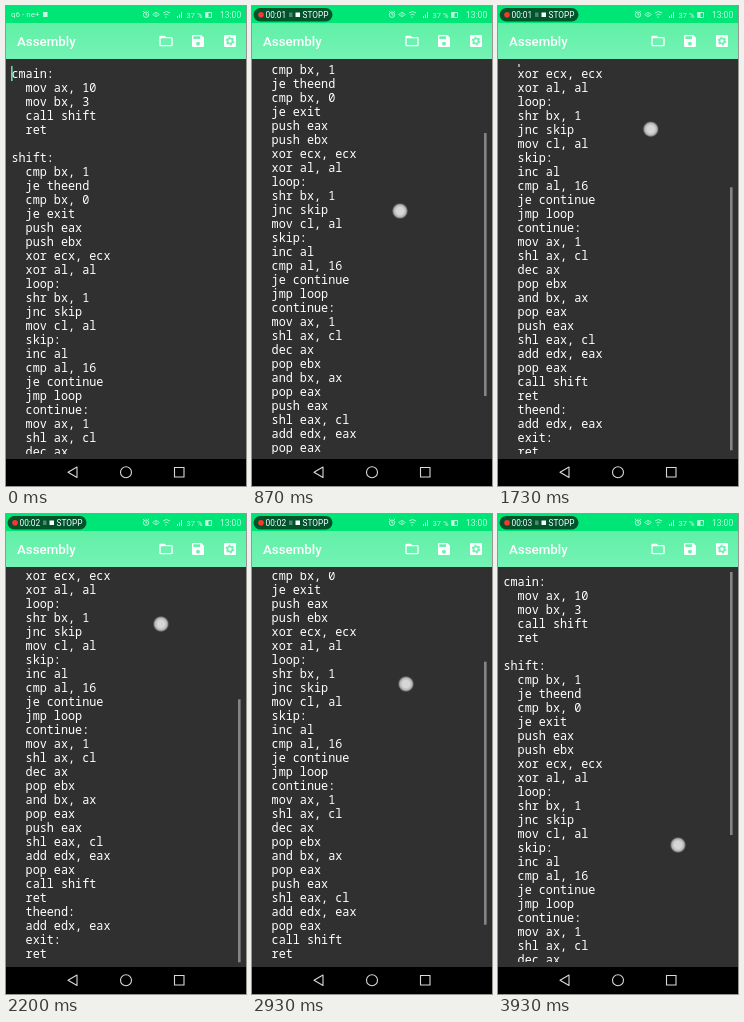
These frames come from a looping animation (240x480 px, 3.99 s). An HTML page:

```html
<!DOCTYPE html>
<html lang="en">
<meta charset="utf-8">
<title>Assembly</title>
<style>
  html, body { margin: 0; width: 100%; height: 100%; overflow: hidden; background: #303030; }
  svg { display: block; width: 100%; height: 100%; }
  text { fill: #fff; font-family: Roboto, sans-serif; white-space: pre; }
  #code text { font: 11.8px "Noto Sans Mono", "DejaVu Sans Mono", monospace; }
  .line { fill: none; stroke: #fff; }
</style>
<svg viewBox="0 0 240 480">
  <defs>
    <linearGradient id="bar" x2="0" y2="1">
      <stop stop-color="#60f0a6"/><stop offset="1" stop-color="#74f3b5"/>
    </linearGradient>
    <radialGradient id="touch">
      <stop offset=".45" stop-color="#d6d6d6"/>
      <stop offset=".75" stop-color="#b4b4b4"/>
      <stop offset=".85" stop-color="#8a8a8a"/>
      <stop offset="1" stop-color="#606060" stop-opacity=".3"/>
    </radialGradient>
    <clipPath id="view"><path d="M0 58H240V448H0z"/></clipPath>
  </defs>
  <rect width="240" height="480" fill="#303030"/>

  <g clip-path="url(#view)">
    <g id="code"><rect id="caret" x="5" y="60" width="1.6" height="15" fill="#5fe0a5"/></g>
  </g>
  <rect id="thumb" x="232" width="2.6" height="263" fill="#858585"/>

  <!-- status bar -->
  <rect width="240" height="17" fill="#00e676"/>
  <g opacity=".78">
    <g id="carrier">
      <text x="5" y="11.3" font-size="8">q6 - ne+</text>
      <path d="M37 6h4.5v5H37z" fill="#fff"/>
    </g>
    <g class="line" stroke-width=".9">
      <circle cx="140" cy="8.7" r="2.7"/>
      <path d="M140 7v2h1.4M137 6l1.3-1.2M143 6l-1.3-1.2"/>
      <path d="M147 8.5q3-4 6 0q-3 4-6 0zM150 7.5v2"/>
      <path d="M157 7q3.5-3 7 0M158.5 9q2-1.6 4 0"/>
      <path d="M199.5 6.5h6v5h-6z"/>
    </g>
    <path d="M160 10.3l1 1.2h-2zM171 12v-2h1v2zM173 12V8.500h1V12zM175 12V6h1v6zM200 7h2.500v4H200z" fill="#fff"/>
    <text x="180.500" y="11.500" font-size="7.600">37 %</text>
    <text x="214" y="11.800" font-size="8.500">13:00</text>
  </g>
  <g id="pill">
    <rect x="1.500" y="2" width="79" height="13.500" rx="6.700" fill="#003d20" opacity=".86"/>
    <circle cx="9" cy="8.700" r="2.800" fill="#f33a2c"/>
    <text id="clock" x="13.500" y="11.800" font-size="8.300"></text>
    <path d="M37 6.500h3.500v4.500H37z" fill="#4c8a67"/>
    <path d="M43.500 6.500h4.500V11h-4.500z" fill="#fff"/>
    <text x="50.500" y="11.800" font-size="8.300">STOPP</text>
  </g>

  <!-- app bar -->
  <rect y="17" width="240" height="36" fill="url(#bar)"/>
  <text x="11" y="39.500" font-size="13.300" font-weight="500">Assembly</text>
  <g fill="#fff" fill-rule="evenodd">
    <path transform="translate(152 27)scale(.667)" d="M4 4h6l2 2h8q2 0 2 2v10q0 2-2 2H4q-2 0-2-2V6q0-2 2-2zM4 8v10h16V8z"/>
    <path transform="translate(184 27)scale(.667)" d="M5 3h12l4 4v12q0 2-2 2H5q-2 0-2-2V5q0-2 2-2zM5 5v4h10V5zM9 16a3 3 0 0 0 6 0a3 3 0 0 0-6 0z"/>
    <rect x="218" y="29" width="12" height="12" rx="1.300"/>
  </g>
  <g fill="none" stroke="#6cf1b0">
    <circle cx="224" cy="35" r="2.500" stroke-width="1.700"/>
    <circle cx="224" cy="35" r="3.800" stroke-width="1.200" stroke-dasharray="2 1.979"/>
  </g>

  <!-- navigation bar -->
  <rect y="453" width="240" height="27"/>
  <g class="line" stroke-width="1.100" opacity=".85">
    <path d="M71 461v10.500L62 466.200z" stroke-linejoin="round"/>
    <circle cx="120" cy="466.300" r="5.500"/>
    <path d="M168.500 461.500h9.500v9.500h-9.500z"/>
  </g>

  <circle id="finger" r="8" fill="url(#touch)"/>
</svg>
<script>
const $ = id => document.getElementById(id);
const STEP = 66.5, STEPS = 60, MAX_SCROLL = 188;

const source = `cmain:|  mov ax, 10|  mov bx, 3|  call shift|  ret||shift:|  cmp bx, 1|  je theend|  cmp bx, 0|  je exit|  push eax|  push ebx|  xor ecx, ecx|  xor al, al|  loop:|  shr bx, 1|  jnc skip|  mov cl, al|  skip:|  inc al|  cmp al, 16|  je continue|  jmp loop|  continue:|  mov ax, 1|  shl ax, cl|  dec ax|  pop ebx|  and bx, ax|  pop eax|  push eax|  shl eax, cl|  add edx, eax|  pop eax|  call shift|  ret|  theend:|  add edx, eax|  exit:|  ret`;
source.split('|').forEach((line, i) => {
  const text = document.createElementNS('http://www.w3.org/2000/svg', 'text');
  text.setAttribute('x', 5.4);
  text.setAttribute('y', 72 + 14 * i);
  text.textContent = line;
  $('code').append(text);
});

// step, finger x, finger y, finger y at which the page stands at its top
const drag = [
  [2, 146, 312, 307], [13, 148, 205, 307], [21, 150.5, 142, 307], [33, 155, 110, 302.5],
  [44, 154, 170, 302.5], [51, 171, 278, 300.5], [59, 180, 331, 300.5]
];

const slope = (i, c) => (drag[i + 1][c] - drag[i][c]) / (drag[i + 1][0] - drag[i][0]);

// Harmonic mean keeps the curve from overshooting
function tangent(i, c) {
  if (!i || i === drag.length - 1) return 0;
  const a = slope(i - 1, c), b = slope(i, c);
  return a * b > 0 ? 2 * a * b / (a + b) : 0;
}

function along(step, c) {
  let i = 0;
  while (i < drag.length - 2 && step >= drag[i + 1][0]) i++;
  const [p, q] = [drag[i], drag[i + 1]], span = q[0] - p[0];
  const u = Math.max(0, Math.min(1, (step - p[0]) / span)), v = 1 - u;
  return v * v * (1 + 2 * u) * p[c] + u * u * (3 - 2 * u) * q[c]
    + span * u * v * (v * tangent(i, c) - u * tangent(i + 1, c));
}

const show = (id, on) => $(id).setAttribute('visibility', on ? 'visible' : 'hidden');

function draw(now) {
  const step = Math.floor((now + 4) / STEP) % STEPS;
  const y = along(step, 2);
  const scroll = Math.max(0, Math.min(MAX_SCROLL, along(step, 3) - y));
  $('code').setAttribute('transform', `translate(0 ${-scroll})`);
  $('thumb').setAttribute('y', 58 + scroll * 0.677);
  $('finger').setAttribute('transform', `translate(${along(step, 1)} ${y})`);
  $('clock').textContent = '00:0' + Math.floor((step + 9) / 19.7);
  show('caret', step < 8);
  show('finger', step >= 2);
  show('thumb', step >= 3);
  show('pill', step >= 2);
  show('carrier', step < 2);
}

const start = performance.now();
function loop() {
  draw(performance.now() - start);
  requestAnimationFrame(loop);
}
loop();
</script>
</html>
```
